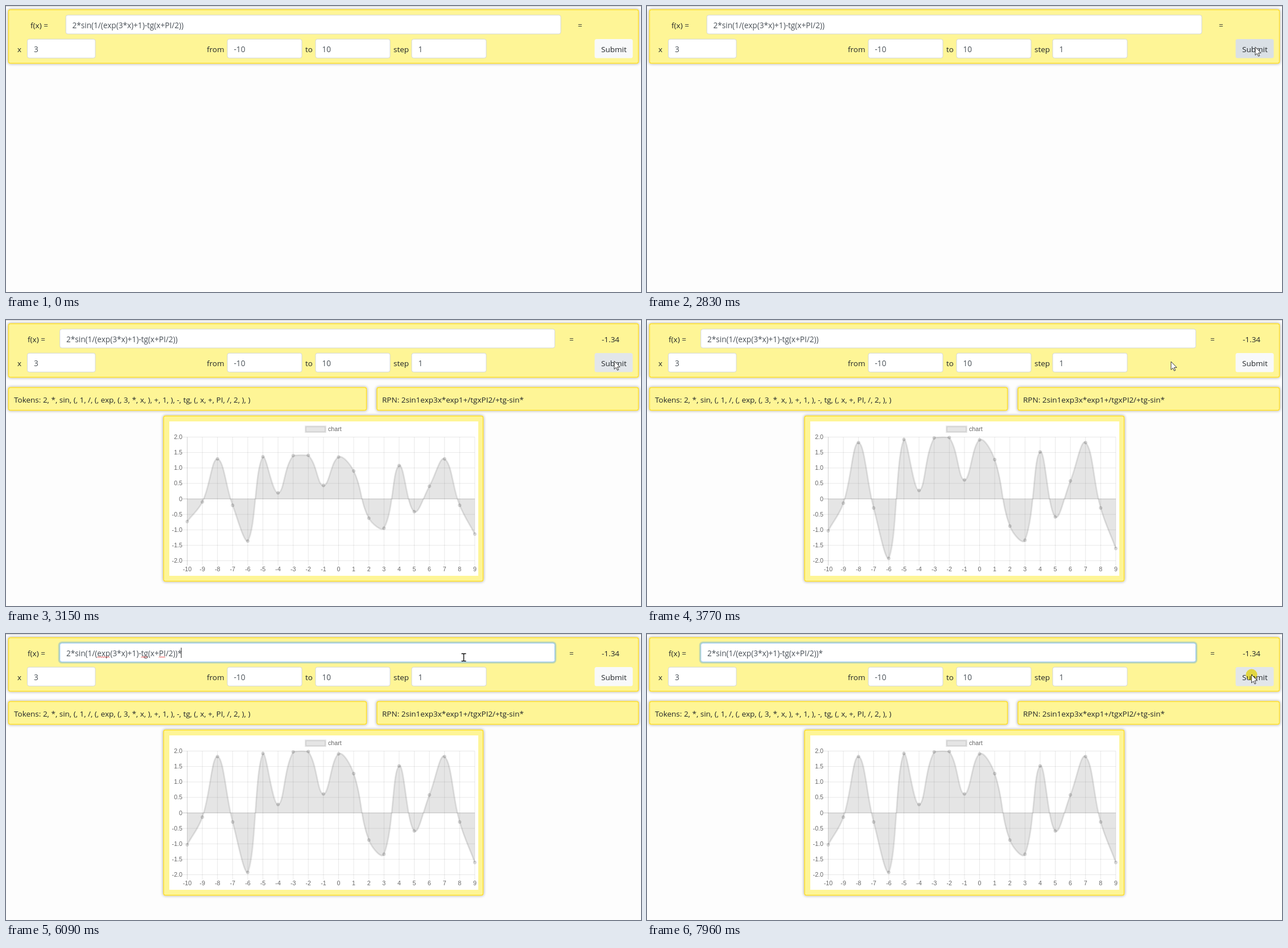
An HTML page that plays this animation: 1116 px wide and 502 px high, repeating every 8 s.

```html
<!DOCTYPE html>
<html lang="en">
<head>
<meta charset="utf-8">
<title>Function plotter</title>
<style>
  html, body { margin: 0; width: 100%; height: 100%; overflow: hidden; background: #fdfdfd; }
  svg { display: block; }
  text { font: 13.5px "Open Sans", "Noto Sans", sans-serif; fill: #212529; white-space: pre; }
  .value { font-size: 13.6px; fill: #495057; }
  .tick { font: 10.7px "Liberation Sans", Arial, sans-serif; fill: #666; }
  .panel { fill: #fef596; stroke: #fddd2a; stroke-width: 1.4; filter: url(#shadow); }
  .input { fill: #fff; stroke: #ced4da; stroke-width: .9; }
</style>
</head>
<body>
<svg id="stage" width="1116" height="502" viewBox="0 0 1116 502">
  <defs>
    <filter id="shadow" filterUnits="userSpaceOnUse" x="-20" y="-20" width="1160" height="540">
      <feDropShadow dx="0" dy="0" stdDeviation="2.6" flood-color="#000" flood-opacity=".4"/>
    </filter>
  </defs>
</svg>
<script>
const LOOP = 8000;
const FORMULA = '2*sin(1/(exp(3*x)+1)-tg(x+PI/2))';
const SHOW_RESULT = 2910, FOCUS = 4930, TYPE_STAR = 6090, LAST_CLICK = 7960;
const stage = document.getElementById('stage');

function add(parent, tag, attrs, content) {
  const node = document.createElementNS('http://www.w3.org/2000/svg', tag);
  set(node, attrs);
  if (content !== undefined) node.textContent = content;
  parent.appendChild(node);
  return node;
}
function set(node, attrs) {
  for (const key in attrs) node.setAttribute(key, attrs[key]);
}
const show = (node, on) => set(node, { visibility: on ? 'visible' : 'hidden' });
const group = (parent = stage) => add(parent, 'g', {});
const box = (parent, cls, x, y, right, bottom, r = 3.5) =>
  add(parent, 'rect', { class: cls, x, y, width: right - x, height: bottom - y, rx: r });
const label = (parent, x, y, content, cls = '') =>
  add(parent, 'text', { x, y, class: cls }, content);
const line = (parent, x1, y1, x2, y2, alpha) =>
  add(parent, 'path', { d: `M${x1} ${y1}L${x2} ${y2}`, stroke: '#000', 'stroke-opacity': alpha, 'stroke-width': .9 });

// Form
add(stage, 'rect', { width: 1116, height: 1, fill: '#d0d0d0' });
box(stage, 'panel', 4.5, 6.5, 1111.5, 100.5, 3);
const functionName = label(stage, 43, 38.5, 'f(x) =');
const equals = label(stage, 1005, 38.5, '=');
const result = label(stage, 1047, 38.5, '-1.34');

const formula = group();
const focusRing = add(formula, 'rect', { x: 103.6, y: 14.6, width: 872.8, height: 35.8, rx: 5, fill: 'none', stroke: '#007bff', 'stroke-opacity': .25, 'stroke-width': 2.8 });
const formulaInput = box(formula, 'input', 105.2, 16, 975, 49);
const formulaText = label(formula, 116.5, 38.5, FORMULA, 'value');
const squiggles = add(formula, 'path', { fill: 'none', stroke: '#e02020', 'stroke-width': .9 });
const caret = add(formula, 'rect', { y: 24, width: 1, height: 18, fill: '#222' });

function drawSquiggles() {
  let d = '';
  for (const word of ['exp', 'tg', 'PI']) {
    const first = FORMULA.indexOf(word);
    const start = formulaText.getStartPositionOfChar(first).x;
    const end = formulaText.getEndPositionOfChar(first + word.length - 1).x;
    for (let x = start, i = 0; x <= end; x += 1.8, i++)
      d += `${i ? 'L' : 'M'}${x.toFixed(1)} ${i % 2 ? 39.6 : 41.4}`;
  }
  set(squiggles, { d });
}

const fields = [['x', 20, 37.5, 157, '3'], ['from', 353, 389, 520, '-10'], ['to', 526, 544, 675, '10'], ['step', 681, 713, 844, '1']];
for (const [name, x, left, right, value] of fields) {
  label(stage, x, 80.5, name);
  box(stage, 'input', left, 58.2, right, 91.3);
  label(stage, left + 11.5, 80.5, value, 'value');
}
const button = box(stage, '', 1034.5, 58, 1101.5, 91.5);
label(stage, 1046, 80.5, 'Submit');

// Results
const output = group();
box(output, 'panel', 4.5, 118.5, 633.5, 158.5, 3);
box(output, 'panel', 652, 118.5, 1111.5, 158.5, 3);
const tokens = FORMULA.match(/[a-z]+|PI|./g).join(', ');
label(output, 14, 145, 'Tokens: ' + tokens);
label(output, 661, 145, 'RPN: 2sin1exp3x*exp1+/tgxPI2/+tg-sin*');
box(output, 'panel', 277, 168.5, 838.5, 458.5, 3);
add(output, 'rect', { x: 287, y: 178, width: 543, height: 271, fill: '#fff' });

// Chart
const LEFT = 318.5, TOP = 205.5, ZERO = 314, BOTTOM = 422.5, STEP_X = 26.6, UNIT = 54.25;
const RIGHT = LEFT + 19 * STEP_X;
add(output, 'rect', { x: 526.5, y: 186.7, width: 35, height: 10, fill: '#000', 'fill-opacity': .1, stroke: '#000', 'stroke-opacity': .1, 'stroke-width': 2.7 });
label(output, 566, 195, 'chart', 'tick');
for (let i = 0; i < 20; i++) {
  const x = LEFT + i * STEP_X;
  line(output, x, TOP, x, 431, i ? .1 : .2);
  set(label(output, x, 441, i - 10, 'tick'), { 'text-anchor': 'middle' });
}
for (let v = -2; v <= 2; v += .5) {
  const y = ZERO - v * UNIT;
  line(output, 310, y, RIGHT, y, v ? .1 : .25);
  set(label(output, 310, y + 3.5, v ? v.toFixed(1) : '0', 'tick'), { 'text-anchor': 'end' });
}

const evaluate = x => x ? 2 * Math.sin(1 / (Math.exp(3 * x) + 1) - Math.tan(x + Math.PI / 2)) : 1.91;
const points = Array.from({ length: 20 }, (_, i) => ({ x: LEFT + i * STEP_X, y: ZERO - evaluate(i - 10) * UNIT }));
const clampY = y => Math.max(TOP, Math.min(BOTTOM, y));
const handles = points.map((p, i) => {
  const a = points[i - 1] || p, b = points[i + 1] || p;
  const before = Math.hypot(p.x - a.x, p.y - a.y), after = Math.hypot(b.x - p.x, b.y - p.y);
  const handle = k => ({ x: p.x + k * (b.x - a.x), y: clampY(p.y + k * (b.y - a.y)) });
  return { into: handle(-.4 * before / (before + after)), out: handle(.4 * after / (before + after)) };
});
const area = add(output, 'path', { fill: '#000', 'fill-opacity': .1 });
const curve = add(output, 'path', { fill: 'none', stroke: '#000', 'stroke-opacity': .1, 'stroke-width': 2.7 });
const dots = points.map(p => add(output, 'circle', { cx: p.x, r: 2.7, fill: '#000', 'fill-opacity': .12, stroke: '#000', 'stroke-opacity': .12, 'stroke-width': .9 }));

function drawChart(growth) {
  const rise = y => ZERO + (y - ZERO) * growth;
  const at = p => `${p.x.toFixed(2)} ${rise(p.y).toFixed(2)}`;
  let d = 'M' + at(points[0]);
  for (let i = 1; i < points.length; i++)
    d += `C${at(handles[i - 1].out)} ${at(handles[i].into)} ${at(points[i])}`;
  set(curve, { d });
  set(area, { d: `${d}L${RIGHT} ${ZERO}L${LEFT} ${ZERO}Z` });
  dots.forEach((dot, i) => set(dot, { cy: rise(points[i].y) }));
}

// Pointer: [first step, last step, steps, x, y] for each leg of its path
const START = [1066, 520];
const LEGS = [
  [790, 945, 3, 1033, 380], [1022, 1100, 2, 1040, 304],
  [1330, 1570, 4, 1041.5, 190.5], [1650, 1890, 4, 1067, 108],
  [2190, 2370, 3, 1069, 72], [3460, 3770, 5, 921, 73],
  [4390, 4700, 5, 804.5, 41], [6790, 7240, 7, 1028, 71],
  [7640, 7790, 3, 1062.5, 71.5]
];
const CLICKS = [[2600, 2830], [FOCUS, 5170], [LAST_CLICK, LOOP]];
const ripple = add(stage, 'circle', { r: 10, fill: '#ffee48', style: 'mix-blend-mode:multiply' });
const arrow = add(stage, 'path', { d: 'M0 0V14.3L3.3 11.3L5.5 16.2L7.6 15.3L5.5 10.4H10Z', fill: '#fff', stroke: '#222', 'stroke-width': .9 });
const beam = add(stage, 'path', { d: 'M-4-6.5H-1L0-6L1-6.5H4M0-6V6M-4 6.5H-1L0 6L1 6.5H4', fill: 'none', stroke: '#111', 'stroke-width': 1.4 });

function pointerAt(t) {
  let [x, y] = START;
  for (const [begin, end, steps, toX, toY] of LEGS) {
    if (t < begin) break;
    const step = Math.min(steps, 1 + Math.floor((t - begin) / (end - begin) * (steps - 1) + 1e-6));
    x += (toX - x) * step / steps;
    y += (toY - y) * step / steps;
  }
  return { x, y };
}

const inside = (t, [from, to]) => t >= from && t < to;

function render(t) {
  const done = t >= SHOW_RESULT, focused = t >= FOCUS;
  show(output, done);
  show(result, done);
  set(functionName, { x: done ? 38 : 43 });
  set(equals, { x: done ? 990 : 1005 });
  set(formula, { transform: `translate(${done ? -10.5 : 0})` });
  if (done) {
    const sampled = SHOW_RESULT + 78 * Math.floor((t - SHOW_RESULT) / 78);
    const progress = Math.min(1, (sampled - 2878) / 1000);
    drawChart(1 - (1 - progress) ** 4);
  }

  const typed = t >= TYPE_STAR;
  formulaText.textContent = FORMULA + (typed ? '*' : '');
  show(focusRing, focused);
  set(focusRing, { opacity: Math.min(1, (t - FOCUS + 80) / 240) });
  set(formulaInput, { style: focused ? 'stroke:#80bdff' : '' });
  show(squiggles, focused && t < LAST_CLICK);
  set(caret, { x: typed ? 318 : 311.5 });
  show(caret, [[FOCUS, 5480], [6010, 6640], [7170, 7720]].some(span => inside(t, span)));

  const { x, y } = pointerAt(t);
  const overInput = x > 94 && x < 965 && y > 16 && y < 50;
  const overButton = x > 1034 && x < 1102 && y > 58 && y < 92;
  const pressed = inside(t, [2600, SHOW_RESULT]);
  set(button, { fill: pressed ? '#dae0e5' : overButton ? '#e2e6ea' : '#f8f9fa' });
  const transform = `translate(${x} ${y})`;
  for (const node of [ripple, arrow, beam]) set(node, { transform });
  show(arrow, t >= 790 && !overInput);
  show(beam, overInput);
  show(ripple, CLICKS.some(span => inside(t, span)));
}

drawSquiggles();
const startTime = performance.now();
function tick() {
  render((performance.now() - startTime) % LOOP);
  requestAnimationFrame(tick);
}
tick();
</script>
</body>
</html>
```
